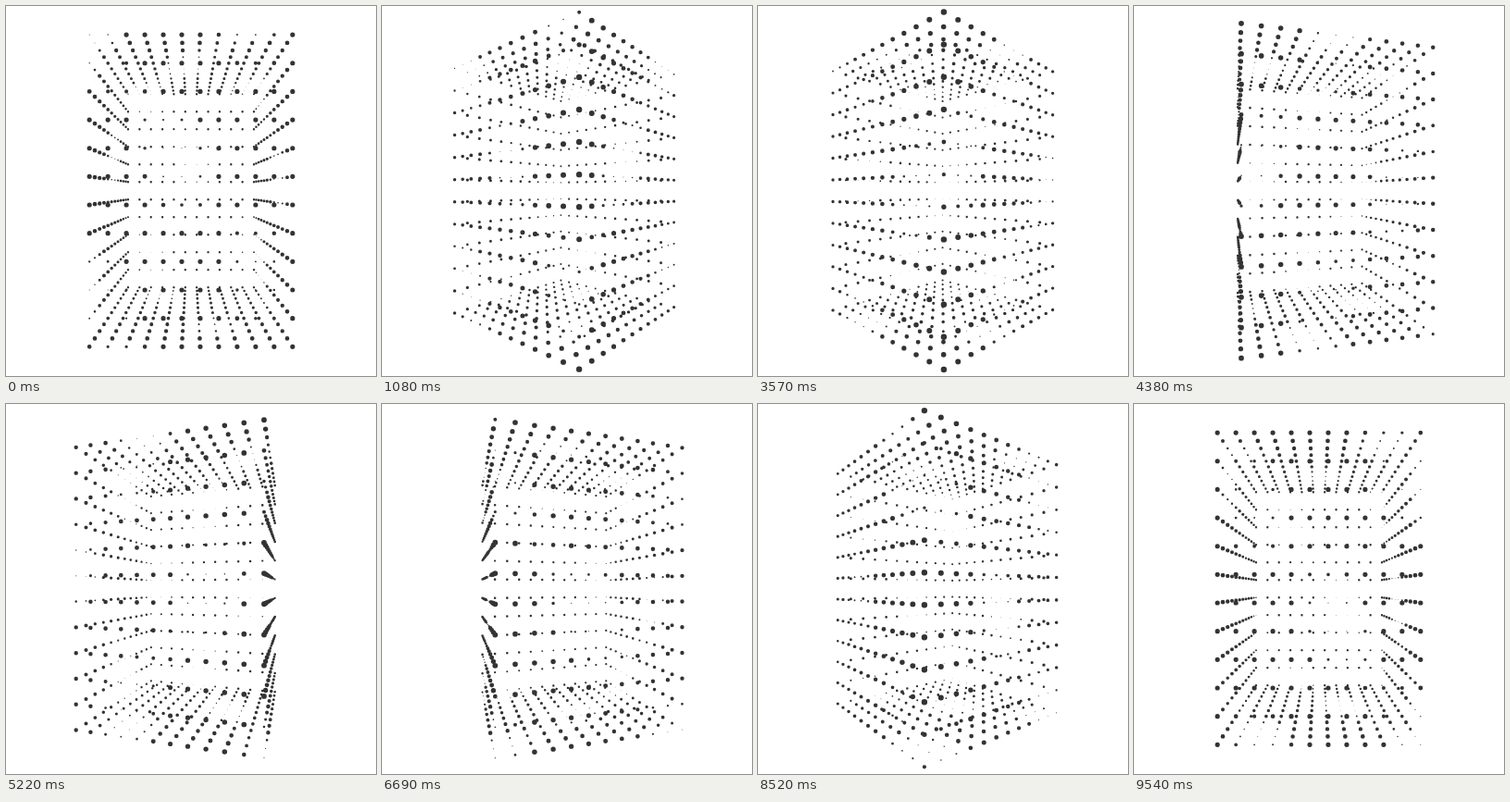
An HTML page with a canvas that plays this animation: 400 by 400 pixels, repeating every 9570 ms.

```html
<!DOCTYPE html>
<html lang="en">
<head>
<meta charset="utf-8">
<title>Rotating dot box</title>
<style>
html, body { margin: 0; width: 100%; height: 100%; overflow: hidden; background: #fff; }
canvas { display: block; width: 100vw; height: 100vh; }
</style>
</head>
<body>
<canvas id="stage" width="400" height="400"></canvas>
<script>
const ctx = document.getElementById('stage').getContext('2d');
const N = 12, LAST = N - 1;
const HALF_W = 84, HALF_H = 129, DEPTH = 357.4;
const STEP = 30, FRAMES = 319;

// Dots lie only on the surface of the box.
const dots = [];
const onEdge = n => n === 0 || n === LAST;
for (let i = 0; i < N; i++)
  for (let j = 0; j < N; j++)
    for (let k = 0; k < N; k++)
      if (onEdge(i) || onEdge(j) || onEdge(k)) dots.push({ i, j, k });

const spread = n => 2 * n / LAST - 1;

// Drifting waves shrink small patches of dots.
function fullness({ i, j, k }, u) {
  const n = Math.cos(.8 * i + .6 * j + .5 * k - 9.12 * u)
    + Math.cos(.75 * i - .7 * j + .5 * k - 6.83 * u)
    + Math.cos(-.6 * i + .75 * j + .7 * k + 4.63 * u);
  return Math.min(1, Math.max(.2, 1.2 - .4 * n));
}

function draw(now) {
  const u = Math.floor(now / STEP) % FRAMES / (FRAMES - 1);
  const sin = Math.sin(u * 2 * Math.PI), cos = Math.cos(u * 2 * Math.PI);
  ctx.fillStyle = '#fff';
  ctx.fillRect(0, 0, 400, 400);
  ctx.fillStyle = '#333';
  ctx.beginPath();
  for (const dot of dots) {
    const x = HALF_W * spread(dot.i), z = -HALF_W * spread(dot.k);
    const scale = DEPTH / (DEPTH - z * cos - x * sin);
    const px = 200 + (x * cos - z * sin) * scale;
    const py = 199.7 + HALF_H * spread(dot.j) * scale;
    const r = 1.68 * scale ** 1.6 * fullness(dot, u);
    ctx.moveTo(px + r, py);
    ctx.arc(px, py, r, 0, 2 * Math.PI);
  }
  ctx.fill();
}

const start = performance.now();
function tick() {
  draw(performance.now() - start);
  requestAnimationFrame(tick);
}
tick();
</script>
</body>
</html>
```
